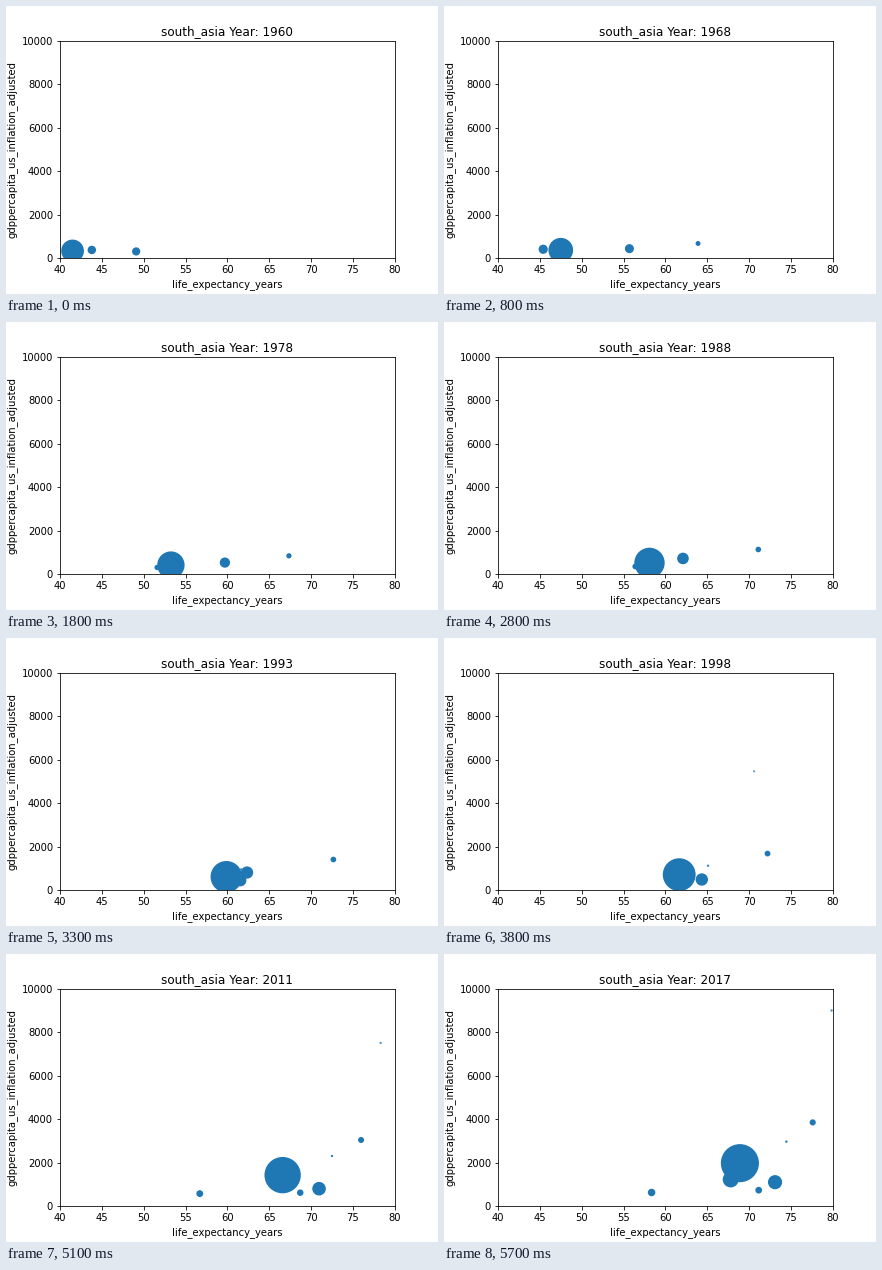
A matplotlib script that plays this animation: 432x288 px, repeating every 5.8 s.

```python
import matplotlib.pyplot as plt
import numpy as np
from matplotlib.animation import FuncAnimation

START, END = 1960, 2017
KNOTS = [1960, 1968, 1978, 1988, 1998, 2011, 2017]


def series(values, **extra):
    """Yearly values from the shared knots plus extra years such as y1971=43.9."""
    points = {y: v for y, v in zip(KNOTS, values) if v is not None}
    points.update({int(k[1:]): v for k, v in extra.items()})
    years = sorted(points)
    span = np.arange(START, END + 1)
    return np.interp(span, years, [points[y] for y in years], left=np.nan)


def population(first, middle, last):
    """Millions of people, growing geometrically between three censuses."""
    span = np.arange(START, END + 1)
    return np.exp(np.interp(span, [1960, 1988, 2017], np.log([first, middle, last])))


# (life expectancy, income per person, population)
countries = [
    # Afghanistan
    (series([None] * 5 + [56.7, 58.35], y2002=52.8, y2008=55.25, y2014=57.8, y2015=57.8),
     series([None] * 5 + [570, 621], y2002=330, y2005=360, y2008=420, y2009=500, y2014=640),
     population(9, 12, 36)),
    # Bangladesh
    (series([43.8, 45.4, 52.6, 58.0, 64.35, 70.95, 73.1],
            y1969=45.9, y1970=45.2, y1971=43.9, y1972=49.2, y1975=50.4,
            y1990=59.6, y1991=58.4, y1992=61.0),
     series([370, 402, 355, 400, 483, 796, 1095], y1970=410, y1972=320, y2005=615),
     population(48, 100, 160)),
    # Bhutan
    (series([None, None, None, 58.2, 65.1, 72.5, 74.45], y1980=53.5),
     series([None, None, None, 780, 1118, 2300, 2960], y1980=440, y1986=600, y2005=1600),
     population(0.22, 0.53, 0.8)),
    # India
    (series([41.5, 47.5, 53.25, 58.1, 61.65, 66.6, 68.9], y1972=49.9),
     series([325, 358, 410, 510, 705, 1420, 1970], y1979=392, y2004=960, y2008=1150),
     population(450, 834, 1339)),
    # Maldives
    (series([None] * 4 + [70.6, 78.3, 79.85], y1995=68.7, y2002=73.7, y2008=77.6, y2014=79.05),
     series([None] * 4 + [5460, 7500, 8990],
            y1995=4900, y2004=6450, y2005=5500, y2006=6800, y2008=7300, y2009=6900),
     population(0.09, 0.21, 0.5)),
    # Nepal
    (series([41.8, 46.5, 51.6, 56.4, 61.7, 68.7, 71.15], y1972=48.9),
     series([295, 297, 300, 345, 450, 612, 728]),
     population(10, 17.8, 27.6)),
    # Pakistan
    (series([49.1, 55.7, 59.7, 62.1, 62.6, 66.0, 67.8]),
     series([302, 430, 525, 715, 825, 1045, 1220], y1992=800, y2002=850, y2007=1030),
     population(45, 102, 208)),
    # Sri Lanka
    (series([None, 63.9, 67.35, 71.1, 72.2, 75.97, 77.6],
            y1961=61.0, y1984=69.8, y1990=71.65, y1994=73.0, y1996=71.9, y2002=73.55,
            y2003=73.8, y2004=70.0, y2005=74.2, y2009=74.3),
     series([None, 668, 837, 1128, 1675, 3037, 3845], y1961=570, y2001=1780, y2008=2570),
     population(10, 16.8, 21.4)),
]
life, income, people = (np.array(part) for part in zip(*countries))

fig, ax = plt.subplots(figsize=(6, 4), dpi=72)
fig.subplots_adjust(left=0.125, right=0.9, bottom=0.125, top=0.88)
bubbles = ax.scatter([], [], color="#1f77b4", linewidths=1.5)
ax.set(xlim=(40, 80), ylim=(0, 10000),
       xlabel="life_expectancy_years",
       ylabel="gdppercapita_us_inflation_adjusted")


def draw(i):
    shown = ~np.isnan(income[:, i])
    bubbles.set_offsets(np.column_stack([life[shown, i], income[shown, i]]))
    bubbles.set_sizes(people[shown, i])
    ax.set_title(f"south_asia Year: {START + i}")
    return [bubbles]


anim = FuncAnimation(fig, draw, frames=END - START + 1, interval=100,
                     init_func=lambda: draw(0), repeat=True, repeat_delay=0)
plt.show()
```
